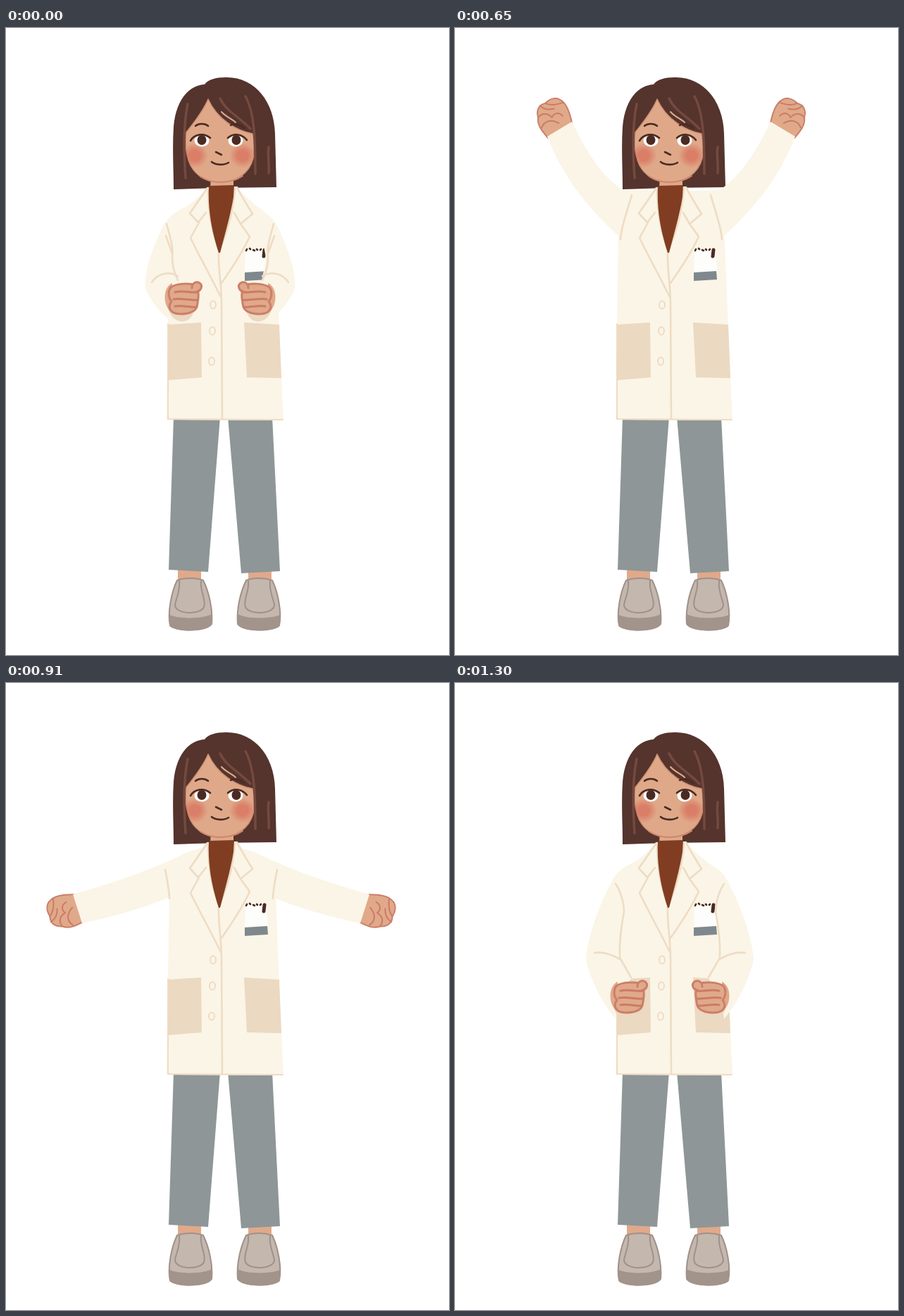
Write an HTML page that moves like this. It is 629 by 890 pixels and loops after 1430 ms.

```html
<!DOCTYPE html>
<html lang="en">
<head>
<meta charset="utf-8">
<title>Arm circles</title>
<style>
html, body { margin: 0; width: 100%; height: 100%; overflow: hidden; background: #fff; }
svg { display: block; width: 629px; height: 890px; }
path { stroke-linecap: round; stroke-linejoin: round; }
.coat { fill: #fbf5e7; }
.seam { fill: none; stroke: #eedcc4; stroke-width: 2.6; }
.beige { fill: #ebd9c1; }
.hair { fill: #54342d; }
.streak { fill: none; stroke: #75493f; stroke-width: 3.5; }
.ink { fill: none; stroke: #4a2b24; stroke-width: 2.6; }
.trousers { fill: #8e9697; }
.skin { fill: #e0a98a; stroke: #cc7f69; stroke-width: 2; }
.fold { fill: none; stroke: #cb7b66; stroke-width: 2; }
.thick { stroke-width: 3; }
.face { fill: #dfa989; stroke: #cf8f72; stroke-width: 1.5; }
</style>
</head>
<body>
<svg viewBox="0 0 629 890">
  <defs>
    <radialGradient id="blush">
      <stop offset=".4" stop-color="#d9705d" stop-opacity=".75"/>
      <stop offset="1" stop-color="#d9705d" stop-opacity="0"/>
    </radialGradient>
    <clipPath id="faceClip"><use href="#face"/></clipPath>

    <g id="fist">
      <path class="skin" d="M-20 2C-22 -10 -24 -22 -17 -30C-14 -41 -6 -45 2 -42C12 -45 21 -41 23 -35C28 -27 25 -12 20 2Z"/>
      <path class="fold" d="M-17 -30C-8 -33 -2 -28 0 -20M-6 -43C-4 -35 2 -31 9 -29M-20 -15C-11 -22 -2 -18 4 -8M2 -42C6 -36 14 -32 24 -30M0 -20C6 -24 12 -22 14 -14"/>
    </g>
    <g id="open">
      <path class="skin" d="M133 413C118 420 108 434 109 448C114 452 138 451 149 447C157 441 162 437 163 431Z"/>
      <path class="fold" d="M111 440C116 436 125 436 122 440C120 442 116 441 113 442"/>
    </g>
    <g id="closed">
      <path class="beige" d="M230 398C236 420 260 424 267 402Z"/>
      <path d="M236 362C222 368 222 396 236 404Z" fill="#e0a98a"/>
      <path class="skin thick" d="M234 368C242 362 262 362 268 365C276 372 273 386 271 396C267 407 244 408 236 403C230 398 232 392 235 388C230 382 230 373 234 368Z"/>
      <path class="skin thick" d="M264 369C264 362 270 359 275 362C280 366 277 373 271 374"/>
      <path class="fold thick" d="M240 375C250 372 260 376 271 375M238 385C250 383 260 387 271 386M240 395C250 393 260 397 269 396"/>
    </g>

    <g id="leg">
      <path d="M244 766H277V786H244Z" fill="#e0a98a"/>
      <path d="M243 784C255 780 270 780 280 784C288 800 294 825 292 846C284 857 241 857 233 848C229 830 235 800 243 784Z" fill="#c4b7ae" stroke="#9f918a" stroke-width="2"/>
      <path d="M232 833C246 839 280 839 292 832L292 847C282 858 240 858 232 848Z" fill="#a2938b"/>
      <path d="M246 785C248 800 240 812 240 820C243 833 276 833 281 822C285 812 275 800 277 785" fill="none" stroke="#9f918a" stroke-width="2"/>
    </g>
  </defs>

  <use href="#leg"/>
  <use href="#leg" transform="matrix(-1 0 0 1 621 0)"/>
  <path class="trousers" d="M238 552H304L287 772L231 769Z"/>
  <path class="trousers" d="M315 552H378L389 771L334 774Z"/>

  <path class="hair" d="M282 80C257 82 241 105 238 140C236 170 238 200 238 229L300 227L384 226L382 150C381 105 354 70 313 70C298 70 287 73 282 80Z"/>
  <path d="M291 208H323V228H290Z" fill="#dfa989"/>
  <path id="face" class="face" d="M287 101C280 118 264 138 256 148C254 165 255 180 262 195C270 210 285 219 303 219C325 219 345 208 351 185C353 172 353 160 350 150C328 146 300 130 287 101Z"/>
  <path d="M276 211C293 222 320 221 336 210" fill="none" stroke="#cf866b" stroke-width="2"/>
  <g clip-path="url(#faceClip)" fill="url(#blush)">
    <ellipse cx="268" cy="181" rx="19" ry="18"/>
    <ellipse cx="336" cy="181" rx="19" ry="18"/>
  </g>
  <path class="streak" d="M258 108C252 135 252 170 255 213M340 97C353 120 354 160 354 207M373 169C371 180 374 190 373 206M304 100C312 118 330 125 347 143"/>
  <path d="M306 119C312 126 321 129 326 134" fill="none" stroke="#dfa989" stroke-width="2"/>
  <g fill="#fff"><ellipse cx="278" cy="160" rx="10.5" ry="8.5"/><ellipse cx="326" cy="160" rx="10.5" ry="8.5"/></g>
  <g fill="#4a2b24"><ellipse cx="278" cy="159" rx="6.5" ry="7"/><ellipse cx="327" cy="159" rx="6.5" ry="7"/></g>
  <path class="ink" d="M262 160C267 151 280 148 290 156M315 156C323 149 335 150 342 159M269 139C274 135 282 135 287 139M319 138C325 135 333 137 338 142M298 176L306 180M292 190C298 195 310 195 316 191"/>

  <path class="coat" d="M286 226C275 240 262 250 246 260L232 290L230 420L228 556L394 557L388 430L383 300L366 260C352 250 340 240 327 225Z"/>
  <path class="seam" style="stroke-width:2" d="M230 420L230 555L393 556"/>
  <path class="beige" d="M231 421L277 418L278 496L230 500ZM338 418L388 421L391 497L342 496Z"/>
  <path d="M340 315L370 314L372 346L339 347Z" fill="#fdfdfb"/>
  <path d="M339 347L371 345L372 357L339 359Z" fill="#7e888d"/>
  <path class="ink" d="M341 316L342 314M346 313L347 314M351 315L353 316M356 314L357 315M361 315L362 314"/>
  <path class="ink" style="stroke-width:5" d="M367 315L366 324"/>

  <g id="arms"></g>

  <path class="seam" d="M286 227L261 263L273 276L284 262M274 276L262 298C275 325 292 355 305 382M287 230C287 270 296 300 303 318M328 226C335 240 343 252 350 264L333 278L324 262M333 278L346 296C335 320 318 345 306 362M325 228C322 270 310 300 302 318M302 318C301 340 306 365 306 390L307 555"/>
  <path d="M288 224L324 223L323 240C319 265 311 292 304 319L302 319C295 297 286 265 288 224Z" fill="#803d22"/>
  <g class="seam" style="stroke-width:2">
    <ellipse cx="294" cy="393" rx="4" ry="5.5"/>
    <ellipse cx="293" cy="430" rx="4" ry="5.5"/>
    <ellipse cx="292" cy="473" rx="4" ry="5.5"/>
  </g>
</svg>
<script>
// One arm per pose: mirror axis, sleeve, seams, hand, hand placement
const poses = [
  [304, 'M280 238C262 255 234 256 221 285C207 315 196 345 198 370C205 388 218 402 229 412L240 402L245 362L239 325L243 305L255 260Z',
    'M228 278C234 300 238 312 236 325C236 340 240 350 244 358M207 361C215 348 232 345 244 352M227 295L236 320',
    'closed', ''],
  [307, 'M222 218C200 228 165 258 153 277C146 298 152 322 172 326C195 328 215 320 232 316L240 330L262 290L280 240L254 247Z',
    'M254 249C240 266 212 288 195 309M223 290C227 302 230 312 231 318M210 293L204 306',
    'fist', 'translate(238 232) rotate(40) scale(.88)'],
  [307, 'M164 186C150 215 142 250 155 275C175 300 205 305 233 305L262 300L285 230L240 238C222 245 205 235 206 180Z',
    'M240 246C234 268 232 285 233 305',
    'fist', 'translate(185 182) rotate(-8)'],
  [307, 'M131 154L166 133C185 172 205 207 238 230L285 231L262 300L234 297C190 258 152 210 131 154Z',
    'M251 237C243 265 236 282 235 300',
    'fist', 'translate(148 144) rotate(-31)'],
  [306.5, 'M109 216C150 230 195 242 240 241L285 230L262 300L233 298C190 292 145 275 103 258Z',
    'M226 250C228 270 232 285 232 300',
    'fist', 'translate(106 235) rotate(-82)'],
  [305.5, 'M285 232L258 240C215 262 150 285 95 300L108 341C150 332 195 320 232 304L240 300L262 250Z',
    'M226 265C229 280 232 295 232 306',
    'fist', 'translate(103 320) rotate(-108)'],
  [305.5, 'M280 238C262 255 236 256 220 280C190 325 160 370 131 412L168 433C190 400 212 370 230 346L236 300L262 260Z',
    'M226 290C231 310 230 330 230 348M131 412L168 433',
    'open', ''],
  [305, 'M280 238C262 255 236 256 222 282C200 330 178 400 165 464L209 461C222 425 230 380 233 340L236 300L262 260Z',
    'M228 287C233 310 233 340 231 365M165 464L209 461',
    'open', 'translate(38 40) rotate(-35 149 422)'],
  [305, 'M280 238C262 255 234 256 222 283C205 315 188 360 186 393C192 420 207 452 228 477L232 440L250 420L234 388L236 315L255 260Z',
    'M228 285C238 300 240 318 240 325C236 345 233 365 234 390L250 418M198 383C212 381 224 386 234 392',
    'closed', 'translate(-5 62)'],
];

const arms = document.getElementById('arms');
arms.innerHTML = poses.map(([axis, sleeve, seams, hand, place]) => {
  const arm = `<use href="#${hand}" transform="${place}"/>`;
  const cloth = `<path class="coat" d="${sleeve}"/><path class="seam" d="${seams}"/>`;
  const side = hand === 'closed' ? cloth + arm : arm + cloth;
  return `<g><g>${side}</g><g transform="matrix(-1 0 0 1 ${2 * axis} 0)">${side}</g></g>`;
}).join('');

const STEP = 130, REST = 2, LOOP = 1430;
function draw(now) {
  const pose = Math.max(0, Math.floor(now % LOOP / STEP) - REST);
  [...arms.children].forEach((g, i) => g.style.display = i === pose ? '' : 'none');
}
const start = performance.now();
function tick() {
  draw(performance.now() - start);
  requestAnimationFrame(tick);
}
tick();
</script>
</body>
</html>
```
